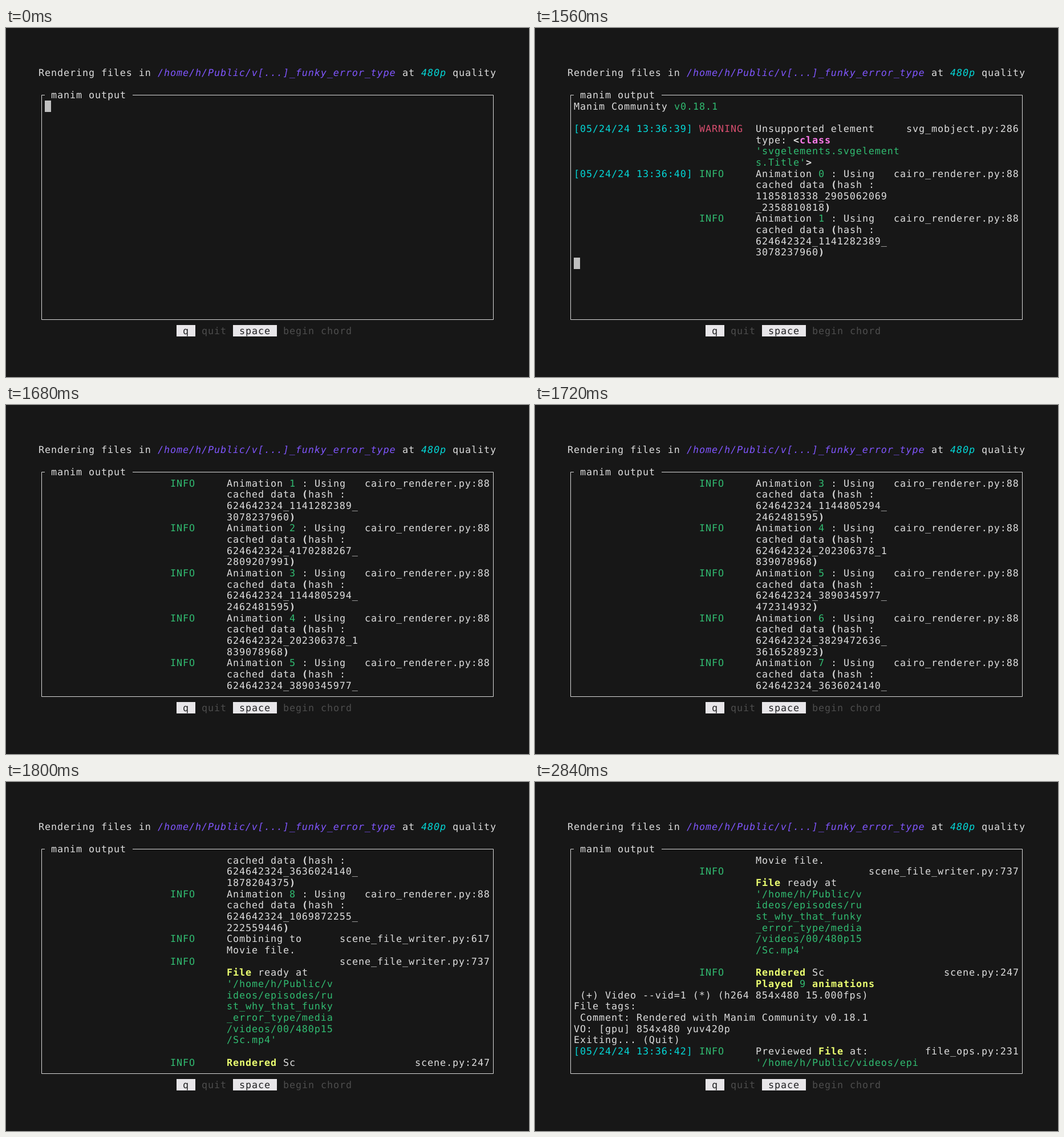
An HTML page that plays this animation: 917 px wide and 611 px high, repeating every 4.28 s.

```html
<!DOCTYPE html>
<html lang="en">
<head>
<meta charset="utf-8">
<title>Render log</title>
<style>
  html, body { margin: 0; width: 100%; height: 100%; overflow: hidden; background: #171717; }
  svg { display: block; width: 100%; height: 100%; }
  text {
    font: 16.8px "DejaVu Sans Mono", monospace;
    letter-spacing: calc(11px - .60205em);
    font-variant-ligatures: none;
    text-rendering: geometricPrecision;
    white-space: pre;
    fill: #ddd;
  }
  .path { fill: #8056ff; font-style: italic; }
  .res { fill: #04d7d7; font-style: italic; }
  .c { fill: #04d7d7; }
  .g { fill: #31bb71; }
  .r { fill: #d74e6f; }
  .b { font-weight: bold; }
  .m { fill: #ff7aea; font-weight: bold; }
  .y { fill: #ebff71; font-weight: bold; }
  .dim { fill: #4d4d4d; }
  .key { fill: #202022; }
  .frame { fill: none; stroke: #d8d8d8; stroke-width: 1; }
</style>
</head>
<body>
<svg id="stage" viewBox="0 0 917 611"></svg>
<script>
const CELL = 11, ROW = 19.66, LEFT = 57, TOP = 68.2, ASCENT = 15.6;
const FIRST_ROW = 3, VISIBLE = 19, LOOP = 4280;
const stage = document.getElementById('stage');

const colX = col => LEFT + col * CELL;
const rowY = row => TOP + row * ROW;

function add(parent, tag, attrs = {}) {
  const node = document.createElementNS('http://www.w3.org/2000/svg', tag);
  for (const name in attrs) node.setAttribute(name, attrs[name]);
  return parent.appendChild(node);
}

// Markup: {class|text} colours a run; everything else is plain.
function write(parent, col, row, markup) {
  for (const [plain, style, styled] of markup.matchAll(/\{(\w+)\|(.*?)\}|[^{]+/g)) {
    const run = styled ?? plain;
    add(parent, 'text', { x: colX(col), y: rowY(row) + ASCENT, class: style || '' }).textContent = run;
    col += run.length;
  }
}

function block(col, row, width, fill) {
  return add(stage, 'rect', {
    x: colX(col), y: Math.round(rowY(row)), width: width * CELL, height: 20, fill
  });
}

// Fixed parts of the screen
write(stage, 0, 0, 'Rendering files in {path|/home/h/Public/v[...]_funky_error_type} at {res|480p} quality');
add(stage, 'path', { class: 'frame', d: 'M68 117.5H62.5V510.5H854.5V117.5H222' });
write(stage, 2, 2, 'manim output');
block(22, 23, 3, '#e8e6e9');
block(31, 23, 7, '#e8e6e9');
write(stage, 23, 23, '{key|q}  {dim|quit}  {key|space}  {dim|begin chord}');

// Log contents: each line is a list of [column, markup]
const lines = [];
const print = text => lines.push(text ? [[1, text]] : []);

function log(level, source, message, time = '') {
  message.forEach((text, i) => {
    const line = [[30, text]];
    if (i === 0) {
      line.push([21, level], [72 - source.length, source]);
      if (time) line.push([1, `{c|[05/24/24 13:36:${time}]}`]);
    }
    lines.push(line);
  });
}

const INFO = '{g|INFO}';
const wrap = (text, width) => text.match(new RegExp(`.{1,${width}}`, 'g'));

print('Manim Community {g|v0.18.1}');
print('');
log('{r|WARNING}', 'svg_mobject.py:286', [
  'Unsupported element', 'type: {b|<}{m|class}', "{g|'svgelements.svgelement}", "{g|s.Title'}{b|>}"
], '39');

[
  '1185818338_2905062069_2358810818',
  '624642324_1141282389_3078237960',
  '624642324_4170288267_2809207991',
  '624642324_1144805294_2462481595',
  '624642324_202306378_1839078968',
  '624642324_3890345977_472314932',
  '624642324_3829472636_3616528923',
  '624642324_3636024140_1878204375',
  '624642324_1069872255_222559446'
].forEach((hash, i) => {
  const [head, tail] = wrap(hash, 21);
  log(INFO, 'cairo_renderer.py:88', [
    `Animation {g|${i}} : Using`, 'cached data {b|(}hash :', head, `${tail}{b|)}`
  ], i === 0 ? '40' : '');
});

const file = "'/home/h/Public/videos/episodes/rust_why_that_funky_error_type/media/videos/00/480p15/Sc.mp4'";
log(INFO, 'scene_file_writer.py:617', ['Combining to', 'Movie file.']);
log(INFO, 'scene_file_writer.py:737', [
  '', '{y|File} ready at', ...wrap(file, 17).map(part => `{g|${part}}`), ''
]);
log(INFO, 'scene.py:247', ['{y|Rendered} Sc', '{y|Played} {g|9} {y|animations}']);
print(' (+) Video --vid=1 (*) (h264 854x480 15.000fps)');
print('File tags:');
print(' Comment: Rendered with Manim Community v0.18.1');
print('VO: [gpu] 854x480 yuv420p');
print('Exiting... (Quit)');
log(INFO, 'file_ops.py:231', ['Previewed {y|File} at:', `{g|${file.slice(0, 26)}}`], '42');

const rows = lines.map(line => {
  const group = add(stage, 'g', { display: 'none' });
  for (const [col, text] of line) write(group, col, FIRST_ROW, text);
  return group;
});
const cursor = block(1, FIRST_ROW, 1, '#c0c0c0');

// [time in ms, lines printed so far]
const steps = [
  [0, 0], [1480, 6], [1520, 10], [1560, 14], [1640, 21], [1680, 29],
  [1720, 37], [1760, 41], [1800, 54], [2560, 60], [2840, 62]
];

let shown = -1;
function show(count) {
  if (count === shown) return;
  shown = count;
  const top = Math.max(0, count - VISIBLE);
  rows.forEach((row, i) => {
    const visible = i >= top && i < count;
    row.setAttribute('display', visible ? 'inline' : 'none');
    if (visible) row.setAttribute('transform', `translate(0 ${(i - top) * ROW})`);
  });
  cursor.setAttribute('display', count < VISIBLE ? 'inline' : 'none');
  cursor.setAttribute('y', Math.round(rowY(FIRST_ROW + count)));
}

const start = performance.now();
function tick() {
  const time = (performance.now() - start) % LOOP;
  show(steps.findLast(([at]) => time >= at)[1]);
  requestAnimationFrame(tick);
}
tick();
</script>
</body>
</html>
```
